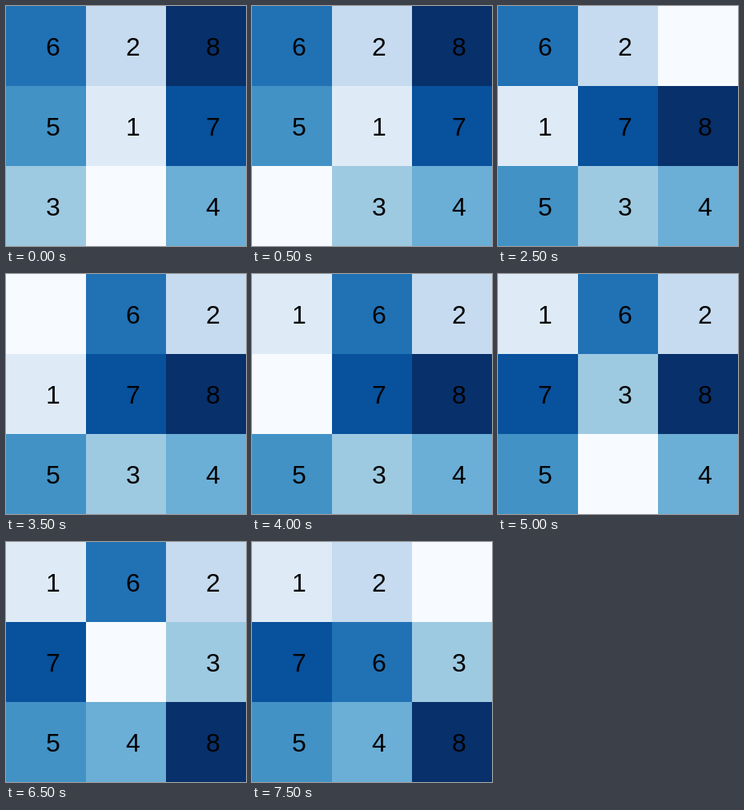
Recreate the animation shown at these times as an HTML page. Size 300 by 300 pixels, loop 8 s.

```html
<!DOCTYPE html>
<html lang="en">
<head>
<meta charset="utf-8">
<title>Sliding puzzle</title>
<style>
  html, body { margin: 0; width: 100%; height: 100%; overflow: hidden; }
  svg { display: block; width: 100vw; height: 100vh; }
  text { font: 32px "Liberation Sans", Arial, sans-serif; }
</style>
</head>
<body>
<svg id="board" viewBox="0 0 300 300" shape-rendering="crispEdges"></svg>
<script>
const CELL = 100, STEP = 500;
const COLORS = ["#f7fbff", "#deebf7", "#c6dbef", "#9ecae1", "#6baed6",
                "#4292c6", "#2171b5", "#08519c", "#08306b"];
const START = [6, 2, 8, 5, 1, 7, 3, 0, 4];
// Cells visited by the gap, one per step.
const GAP_PATH = [7, 6, 3, 4, 5, 2, 1, 0, 3, 4, 7, 8, 5, 4, 1, 2];

const board = document.getElementById("board");

function add(parent, name, attrs) {
  const node = document.createElementNS("http://www.w3.org/2000/svg", name);
  for (const key in attrs) node.setAttribute(key, attrs[key]);
  return parent.appendChild(node);
}

const tiles = COLORS.map((fill, value) => {
  const tile = add(board, "g", {});
  add(tile, "rect", { width: CELL, height: CELL, fill });
  if (value) add(tile, "text", { x: 50, y: 62 }).textContent = value;
  return tile;
});

function layoutAt(step) {
  const cells = START.slice();
  for (let i = 1; i <= step; i++) {
    const from = GAP_PATH[i - 1], to = GAP_PATH[i];
    [cells[from], cells[to]] = [cells[to], cells[from]];
  }
  return cells;
}

function draw(time) {
  const step = Math.floor(time / STEP) % GAP_PATH.length;
  layoutAt(step).forEach((value, cell) => {
    const x = cell % 3 * CELL, y = Math.floor(cell / 3) * CELL;
    tiles[value].setAttribute("transform", `translate(${x} ${y})`);
  });
}

const origin = performance.now();
function tick() {
  draw(performance.now() - origin);
  requestAnimationFrame(tick);
}
tick();
</script>
</body>
</html>
```
